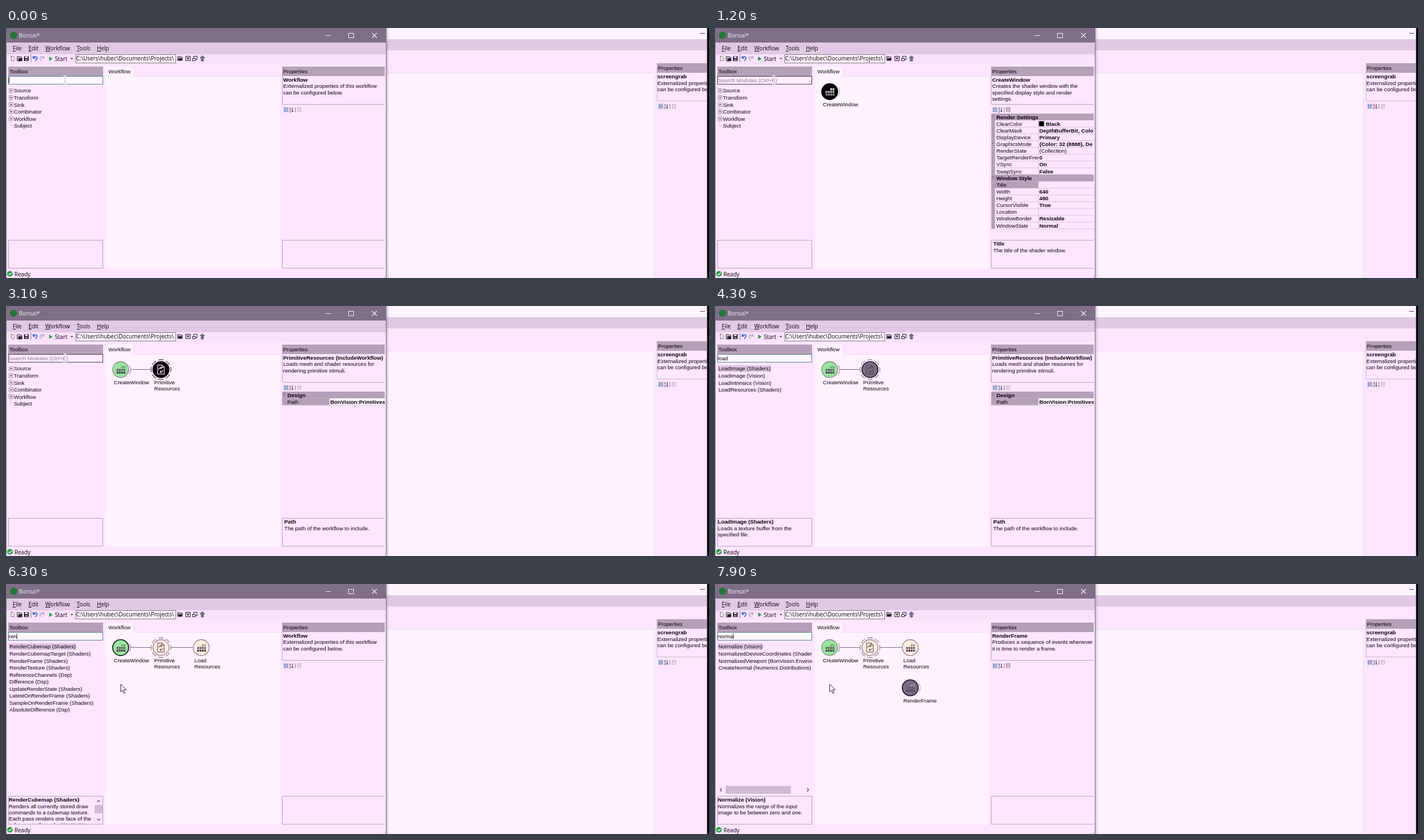
These frames come from a looping animation (1253 by 447 pixels, 8000 ms). An HTML page:

```html
<!DOCTYPE html>
<html lang="en">
<head>
<meta charset="utf-8">
<title>Workflow editor</title>
<style>
  html, body { margin: 0; width: 100%; height: 100%; overflow: hidden; background: #fff2ff; }
  svg { display: block; width: 1253px; height: 447px; }
  text { font: 9.65px "Liberation Sans", Arial, sans-serif; fill: #08020a; white-space: pre; }
  .b { font-weight: bold; font-size: 9.75px; }
  .ui { font: 10.05px "Open Sans", "Noto Sans", sans-serif; }
  .u { text-decoration: underline; }
</style>
</head>
<body>
<svg id="stage" viewBox="0 0 1253 447">
  <defs>
    <clipPath id="leftClip"><rect x="4" y="69" width="169" height="360"/></clipPath>
    <clipPath id="rightClip"><rect x="492" y="69" width="183" height="361"/></clipPath>
    <clipPath id="backClip"><rect x="680" y="0" width="569" height="447"/></clipPath>
    <clipPath id="nameClip"><rect x="492" y="150" width="84" height="240"/></clipPath>
    <clipPath id="pathClip"><rect x="125" y="47" width="176" height="16"/></clipPath>
    <linearGradient id="shadow"><stop stop-color="#8d7c95" stop-opacity=".45"/><stop offset="1" stop-color="#8d7c95" stop-opacity="0"/></linearGradient>
  </defs>
  <g id="base"></g>
  <g id="live"></g>
</svg>
<script>
const LOOP = 8000, STEP = 100;
const PANEL = '#ffe6ff', PAPER = '#fff2ff', HEAD = '#b4a0b8', MENU = '#e1c9e5',
      EDGE = '#b39fb8', INK = '#2c2430', GREEN = '#98e59c', CREAM = '#ffeddf', DIM = '#7d6c82';

const rect = (x, y, w, h, fill, stroke = 'none') =>
  `<rect x="${x}" y="${y}" width="${w}" height="${h}" fill="${fill}" stroke="${stroke}"/>`;
const frame = (x, y, w, h, stroke, fill = 'none') => rect(x + .5, y + .5, w - 1, h - 1, fill, stroke);
const path = (d, stroke, width = 1, fill = 'none') =>
  `<path d="${d}" fill="${fill}" stroke="${stroke}" stroke-width="${width}"/>`;
const text = (x, y, s, cls = '', fill = '') =>
  `<text x="${x}" y="${Math.round(y)}" class="${cls}"${fill && ` style="fill:${fill}"`}>${s}</text>`;
const lines = (x, y, rows) => rows.map((s, i) => text(x, y + i * 11.3, s)).join('');
const clip = (id, body) => `<g clip-path="url(#${id})">${body}</g>`;

const pen = document.createElement('canvas').getContext('2d');
pen.font = '9.65px "Liberation Sans", Arial, sans-serif';
const widthOf = s => pen.measureText(s).width;

// Modules offered by the toolbox search
const MODULES = [
  'AbsoluteDifference (Dsp)', 'CameraCapture (Vision)', 'Canny (Vision)', 'Concat (Dsp)', 'Condition (Reactive)',
  'CreateNormal (Numerics.Distributions)', 'CreateTimestamped (Reactive)', 'CreateWindow (Shaders)', 'Crop (Vision)',
  'CsvReader (IO)', 'CsvWriter (IO)', 'Difference (Dsp)', 'LatestOnRenderFrame (Shaders)', 'Level (Dsp)',
  'LoadImage (Shaders)', 'LoadImage (Vision)', 'LoadIntrinsics (Vision)', 'LoadResources (Shaders)', 'Negate (Vision)',
  'Normalize (Vision)', 'NormalizedDeviceCoordinates (Shaders)', 'NormalizedViewport (BonVision.Environment)',
  'PrimitiveResources (BonVision)', 'Projection (BonVision)', 'Publish (Reactive)', 'Range (Reactive)',
  'ReferenceChannels (Dsp)', 'RenderCubemap (Shaders)', 'RenderCubemapTarget (Shaders)', 'RenderFrame (Shaders)',
  'RenderTexture (Shaders)', 'Repeat (Reactive)', 'SampleOnRenderFrame (Shaders)', 'UpdateRenderState (Shaders)'
];
const ABOUT = {
  'LoadImage (Shaders)': ['Loads a texture buffer from the', 'specified file.'],
  'LoadImage (Vision)': ['Loads an image from the specified', 'file.'],
  'LoadIntrinsics (Vision)': ['Loads camera intrinsics from the', 'specified file.'],
  'LoadResources (Shaders)': ['Loads a collection of resources', 'into the resource manager.'],
  'CreateWindow (Shaders)': ['Creates the shader window with', 'the specified display style and', 'render settings.'],
  'PrimitiveResources (BonVision)': ['Loads mesh and shader resources', 'for rendering primitive stimuli.'],
  'RenderCubemap (Shaders)': ['Renders all currently stored draw', 'commands to a cubemap texture.', 'Each pass renders one face of the', 'cubemap in the order X+, X-, Y+,'],
  'RenderCubemapTarget (Shaders)': ['Renders all currently stored draw', 'commands to a cubemap texture.'],
  'RenderFrame (Shaders)': ['Produces a sequence of events', 'whenever it is time to render a', 'frame.'],
  'Normalize (Vision)': ['Normalizes the range of the input', 'image to be between zero and one.']
};
const matchAt = (m, q) => m.split(' (')[0].toLowerCase().indexOf(q);
const search = q => MODULES.filter(m => matchAt(m, q) >= 0)
  .sort((a, b) => matchAt(a, q) - matchAt(b, q)).slice(0, 20);

// Typing sessions: focus time, first key, commit, interval per key, word, arrow-down times
const TYPING = [
  { from: 0, key: 100, to: 1200, gap: 150, word: 'createw', down: [] },
  { from: 1500, key: 1500, to: 2700, gap: 200, word: 'primi', down: [] },
  { from: 3300, key: 3300, to: 4800, gap: 130, word: 'load', down: [4400, 4500, 4700] },
  { from: 6000, key: 6000, to: 7200, gap: 150, word: 'render', down: [6900, 7000] },
  { from: 7500, key: 7500, to: 8000, gap: 100, word: 'norma', down: [] }
];
const NODES = [
  { at: 1200, until: 2700, x: 204.4, y: 113.7, label: ['CreateWindow'], fill: GREEN, arc: true },
  { at: 2700, until: 4800, x: 276.2, y: 113.7, label: ['Primitive', 'Resources'], fill: CREAM, ring: true },
  { at: 4800, until: 5800, x: 348, y: 113.7, label: ['Load', 'Resources'], fill: CREAM },
  { at: 7200, until: LOOP, x: 348, y: 185.5, label: ['RenderFrame'], fill: GREEN, arc: true }
];
const WORKFLOW = { at: 0, name: 'Workflow', about: ['Externalized properties of this workflow', 'can be configured below.'] };
const PROPS = [
  WORKFLOW,
  { at: 1200, name: 'CreateWindow', about: ['Creates the shader window with the', 'specified display style and render', 'settings.'], dark: true,
    rows: ['#Render Settings', 'ClearColor|Black', 'ClearMask|DepthBufferBit, Color', 'DisplayDevice|Primary',
      'GraphicsMode|{Color: 32 (8888), De', 'RenderState|(Collection)', 'TargetRenderFrequency|0', 'VSync|On', 'SwapSync|False',
      '#Window Style', 'Title|', 'Width|640', 'Height|480', 'CursorVisible|True', 'Location|', 'WindowBorder|Resizable', 'WindowState|Normal'],
    pick: 'Title', help: 'The title of the shader window.' },
  { at: 2700, name: 'PrimitiveResources (IncludeWorkflow)', about: ['Loads mesh and shader resources for', 'rendering primitive stimuli.'],
    rows: ['#Design', 'Path|BonVision:Primitives'], pick: 'Path', help: 'The path of the workflow to include.' },
  { at: 4800, name: 'LoadResources', about: ['Loads a collection of resources into the', 'resource manager.'] },
  { ...WORKFLOW, at: 5800 },
  { at: 7200, name: 'RenderFrame', about: ['Produces a sequence of events whenever', 'it is time to render a frame.'], dark: true }
];

function gridTools(x, y, dark) {
  let s = rect(x, y - 5, 10, 10, '#cbd0f4');
  for (let i = 0; i < 3; i++)
    s += rect(x + 2, y - 3 + i * 2.6, 2, 1.5, '#536aa8') + rect(x + 5, y - 3 + i * 2.6, 3.5, 1, '#6f6078');
  s += `<text x="${x + 11}" y="${y}" style="font-size:5px">A</text><text x="${x + 11}" y="${y + 4.5}" style="font-size:5px">Z</text>`;
  s += path(`M${x + 16.5} ${y - 4}v8m-1.5 -2l1.5 2l1.5 -2`, INK, .9) + path(`M${x + 21.5} ${y - 4}v9`, '#8d7b93');
  const c = dark ? '#85748b' : '#c0aec6';
  return s + frame(x + 25, y - 4, 7, 8, c) + path(`M${x + 26.5} ${y - 1.5}h4m-4 2h4`, c);
}

function toolbar() {
  let s = path('M9.5 50.5h3l2 2v6h-5z', '#5f5165', .8, '#fff') + path('M8 50l3 2', '#c89a5a', 1);
  s += path('M20 51h4l1 1h3v7h-8z', INK, 1, '#d9c5de') + rect(22, 54, 7, 5, INK);
  s += rect(32, 50.5, 8.5, 8.5, INK) + rect(34, 51, 4.5, 3, '#eadcee') + rect(34, 56, 4.5, 2, '#bba8c0');
  s += path('M44.5 48v13', '#86748c');
  s += path('M48.5 50v4h4M49 53.5q3 -4 6 -1q1.5 3 -3 6', '#2f63bd', 1.7);
  s += path('M67.5 50v4h-4M67 53.5q-3 -4 -6 -1q-1.5 3 3 6', '#baa6c1', 1.5);
  s += path('M77 51l6 4l-6 4z', 'none', 0, '#2f9a48') + text(87, 58.7, 'Start', 'ui');
  s += path('M115 53.8h4.6l-2.3 2.5z', 'none', 0, INK) + frame(124, 47, 179, 16, '#84738b', '#fff5ff');
  s += clip('pathClip', text(125, 58.4, 'C:\\Users\\hubec\\Documents\\Projects\\', 'ui'));
  s += path('M306 51h4l1 1h3v6h-8z', INK, 1, '#cbb8d0') + rect(307, 54, 7, 4, INK);
  s += frame(320, 50, 9, 9, INK) + path('M322 53h5M324.5 53v4m-2 -2h4', INK);
  s += frame(334, 50, 7, 7, INK) + frame(332, 54, 6, 5, INK, PANEL);
  return s + path('M346 53.5l4 -4l4 4zM348 55h4v4h-4z', '#3d4664', 1, '#73809e');
}

function drawBase() {
  // Window behind
  let s = rect(0, 0, 1253, 447, PANEL) + rect(678, 0, 575, 20, '#fff5ff') + rect(678, 20, 575, 20, MENU);
  s += rect(678, 80, 477, 367, PAPER) + path('M678 80.5h477M1155.5 80v367', '#eedaf0');
  s += rect(1160, 63, 89, 17, HEAD) + path('M1160.5 80v50.5H1249', '#c7b4cc');
  s += clip('backClip', text(1162, 75, 'Properties') + text(1161, 90, 'screengrab', 'b')
    + lines(1161, 101.5, ['Externalized properties of', 'can be configured below.']) + gridTools(1162, 140, false));
  s += path('M1237 9.5h9', '#4c3f52') + rect(1249.5, 0, 3.5, 447, '#070609');
  // Main window
  s += rect(678, 0, 5, 447, 'url(#shadow)') + rect(0, 0, 678, 447, PANEL);
  s += rect(0, 0, 678, 26, '#7f6f86') + rect(0, 26, 677, 21, MENU) + rect(0, 47, 677, 18, '#fbe2fc');
  s += '<circle cx="13.5" cy="13" r="6.5" fill="#24733a"/>' + text(23, 17.2, 'Bonsai*', 'ui', '#f8eaff');
  s += path('M570 13.5h9M661 9l-8.5 8.5M652.5 9l8.5 8.5', '#fff0ff', 1.1) + frame(610, 9, 10, 9, '#fff0ff');
  [['File', 12], ['Edit', 40], ['Workflow', 70], ['Tools', 126], ['Help', 162]].forEach(([m, x]) => {
    s += text(x, 40.4, `<tspan class="u">${m[0]}</tspan>${m.slice(1)}`, 'ui');
  });
  s += toolbar();
  s += rect(4, 69, 169, 17, HEAD) + text(6, 80.8, 'Toolbox') + frame(4, 379, 169, 51, EDGE);
  s += rect(178, 69, 50, 18, PAPER) + rect(178, 87, 310, 343, PAPER) + path('M228.5 70v16.5H488', '#eedaf0') + text(182.5, 80.8, 'Workflow');
  s += rect(492, 69, 183, 17, HEAD) + text(494, 80.8, 'Properties');
  s += path('M492.5 86v50.5H675M675 379.5H492.5v50H675', EDGE);
  s += '<circle cx="7" cy="439.5" r="5" fill="#26983f"/>' + path('M4.5 439.5l2 2l3.5 -4', '#fff', 1.4) + text(15, 443.8, 'Ready', 'ui');
  s += path('M.5 26v421M677.5 0v447', '#807087') + path('M673 445h2m1 -3h1m-1 3h1', '#b8a5be');
  document.getElementById('base').innerHTML = s;
}

function tree() {
  let s = path('M8.5 112v63h5', '#cbb6d0', .8);
  ['Source', 'Transform', 'Sink', 'Combinator', 'Workflow', 'Subject'].forEach((name, i) => {
    const y = 112 + i * 12.55;
    if (i < 5) s += rect(5.5, y - 3.5, 7, 7, '#fff0ff', '#a592ab') + path(`M7 ${y}h4M9 ${y - 2}v4`, '#3a3040', .9);
    s += text(14, y + 3.4, name);
  });
  return s;
}

function results(items, pick) {
  let s = '';
  items.forEach((m, i) => {
    const y = 112 + i * 12.55;
    if (i === pick) s += rect(5, y - 6, widthOf(m) + 2, 12, '#dfc6e3');
    s += text(6, y + 3.4, m);
  });
  if (items.some(m => m.length > 32))
    s += rect(4, 361, 169, 14, PANEL) + rect(19, 361, 116, 14, '#cfb9d4') + path('M12 365l-3 3l3 3M164 365l3 3l-3 3', '#4a3d50', 1.2);
  const name = items[pick], about = ABOUT[name] || [];
  if (name) s += text(5, 389, name, 'b') + lines(5, 400.5, about);
  if (about.length > 3)
    s += rect(158, 380, 14, 49, PANEL) + rect(158, 395, 14, 15, '#cfb9d4') + path('M162.5 389.5l2.5 -2.5l2.5 2.5M162.5 420l2.5 2.5l2.5 -2.5', '#4a3d50', 1.1);
  return s;
}

function toolbox(t, session) {
  if (!session) return frame(4, 86, 169, 15, '#453a4b', '#ffedff') + text(5, 96.8, 'Search Modules (Ctrl+E)', '', '#8c7a92') + tree();
  const { key, gap, word, down } = session;
  const n = t < key ? 0 : Math.min(word.length, 1 + Math.floor((t - key) / gap));
  const query = word.slice(0, n);
  let s = frame(4, 86, 169, 15, '#557f98', '#fff8ff') + text(5, 96.8, query);
  const last = n ? key + (n - 1) * gap : 0;
  if ((t - last) % 1000 < 500) {
    const x = 5.5 + widthOf(query);
    s += path(`M${x} 88.5v10`, INK);
  }
  return s + (n ? results(search(query), down.filter(d => t >= d).length) : tree());
}

// Blocks shade from the top row to the bottom row
function shaderIcon(x, y, tones) {
  let s = '';
  tones.forEach((tone, r) => {
    for (let c = r ? 0 : 2; c < 4; c++)
      s += rect(x - 7.2 + c * 4.1, y - 6 + r * 4.8, 3.2, 3.6, tone);
  });
  return s;
}

function includeIcon(x, y, color) {
  return path(`M${x - 6} ${y - 8}h8l4 4v12h-12zM${x + 2} ${y - 8}v4h4`, color, 1.2)
    + path(`M${x - 4} ${y}q1 -4 5 -3m-1.5 -2l2 2l-2 2M${x + 4} ${y + 1}q-1 4 -5 3m1.5 -2l-2 2l2 2`, color, 1.3);
}

function node(n, state, focused) {
  const { x, y } = n;
  const [fill, edge, ...tones] = {
    active: ['#050305', '#050305', '#eadfed', '#c2b5c6', '#978a9b'],
    dim: [DIM, '#1d1620', '#a08da5', '#675a6d', '#54485a'],
    idle: [n.fill, focused ? '#101510' : '#8e7f92', n.fill === GREEN ? '#7d9a84' : '#a39599', '#62586a', '#4a404f']
  }[state];
  let s = `<circle cx="${x}" cy="${y}" r="14.2" fill="${fill}" stroke="${edge}" stroke-width="${focused || state !== 'idle' ? 1.7 : 1.3}"/>`;
  if (n.ring)
    s += `<circle cx="${x}" cy="${y}" r="17.7" fill="none" stroke="${state === 'active' ? '#494050' : '#938198'}" stroke-width="1.3" pathLength="80" stroke-dasharray="7 3" stroke-dashoffset="3.5"/>`;
  if (n.arc) s += path(`M${x + 15.5} ${y - 8}a17.5 17.5 0 0 1 0 16`, state === 'idle' ? '#a093a4' : '#8fcb98', 1.2);
  s += n.ring ? includeIcon(x, y, state === 'idle' ? '#6e5f6f' : state === 'dim' ? tones[2] : tones[0]) : shaderIcon(x, y, tones);
  n.label.forEach((l, i) => { s += text(x - 12.2, y + 26.7 + i * 10.7, l); });
  return s;
}

function graph(t, typing) {
  let s = '';
  if (t >= 2700) s += path('M222 113.5h36', '#76687b');
  if (t >= 4800) s += path('M294 113.5h39', '#76687b');
  NODES.filter(n => t >= n.at).forEach((n, i) => {
    const state = t >= n.until ? 'idle' : typing ? 'dim' : 'active';
    s += node(n, state, i === 0 && t >= 5800 && t < 7200);
  });
  return s;
}

function properties(t) {
  const p = PROPS.filter(q => t >= q.at).pop();
  let s = text(494, 95.8, p.name, 'b') + lines(494, 107.3, p.about) + gridTools(494, 146, p.dark);
  if (!p.rows) return s;
  const h = 12.125, y0 = 153;
  s += rect(492.5, y0, 6.5, p.rows.length * h, HEAD);
  p.rows.forEach((row, i) => {
    const y = y0 + i * h, base = y + 9.5;
    if (row[0] === '#') {
      s += rect(492.5, y, 182.5, h, HEAD) + text(501.5, base, row.slice(1), 'b') + path(`M493.5 ${y + 4}h4m-4 3h4`, '#63566a', .8);
      return;
    }
    const [name, value] = row.split('|'), picked = name === p.pick;
    if (picked) s += rect(492.5, y, 83.5, h, HEAD) + (value ? rect(576.5, y, 98.5, h, '#fff5ff') : '');
    s += path(`M499 ${y + h}H675M576.5 ${y}v${h}`, '#cdb8d2', .8);
    s += clip('nameClip', text(501.5, base, name));
    if (name === 'ClearColor') s += rect(577.5, y + 1.5, 9, 9, '#050305');
    s += text(name === 'ClearColor' ? 589.5 : 578, base, value, value[0] === '(' ? '' : 'b');
    if (name === 'GraphicsMode') s += path(`M493.5 ${y + 4}h4`, '#63566a', .8);
  });
  return s + text(496, 389, p.pick, 'b') + text(496, 401, p.help);
}

function pointer(t, session) {
  const k = Math.min(1, Math.max(0, (t - 5100) / 600)), e = k * k * (3 - 2 * k);
  const x = 105 + 99.5 * e, y = 92.5 + 86.5 * e;
  if (y < 101) {
    if (session && t >= session.key) return '';
    const d = `M${x - 3} ${y - 7.5}q3 0 3 2v11q0 2 -3 2m6 -15q-3 0 -3 2m0 11q0 2 3 2`;
    return path(d, '#b9a8be', 2) + path(d, '#fff6ff', 1.2);
  }
  return path(`M${x} ${y}v14l3.2 -3l2.3 5.5l2.2 -1l-2.3 -5.3h4.5z`, '#2b222f', 1, '#fff6ff');
}

const live = document.getElementById('live');
let shown = -1;
function render(ms) {
  const t = Math.floor((ms % LOOP) / STEP) * STEP;
  if (t === shown) return;
  shown = t;
  const session = TYPING.find(s => t >= s.from && t < s.to);
  live.innerHTML = clip('leftClip', toolbox(t, session)) + graph(t, session) + clip('rightClip', properties(t)) + pointer(t, session);
}

drawBase();
const start = performance.now();
function tick() {
  render(performance.now() - start);
  requestAnimationFrame(tick);
}
render(0);
requestAnimationFrame(tick);
</script>
</body>
</html>
```
